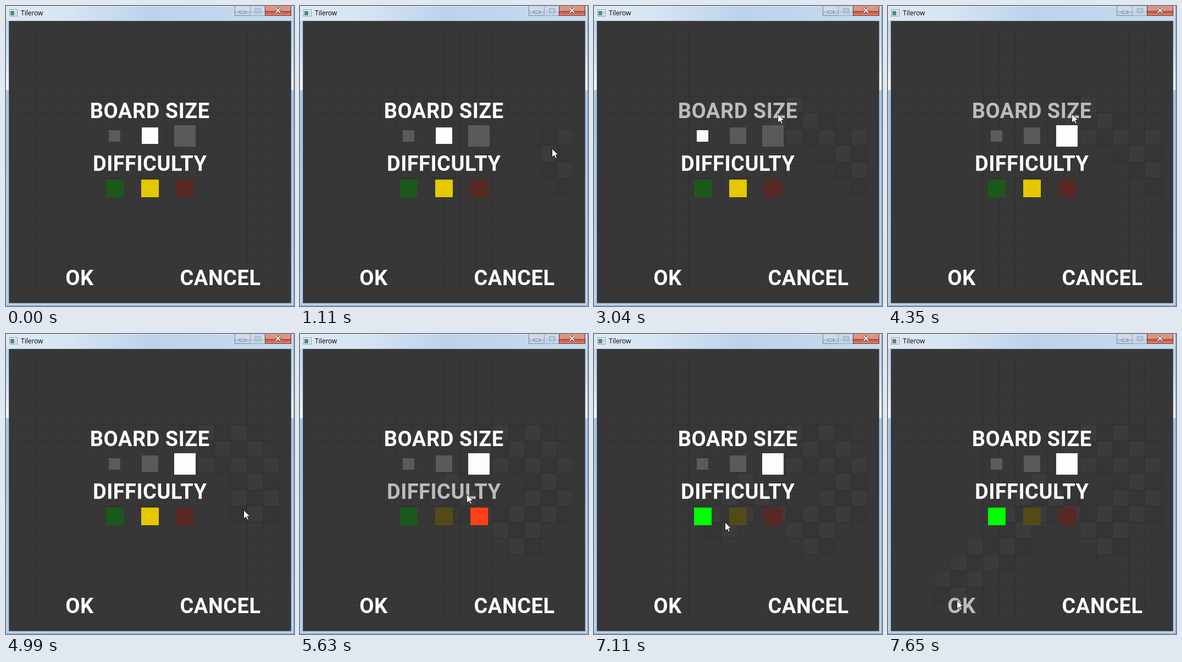
An HTML page with a canvas that plays this animation: 524x546 px, repeating every 8000 ms.

```html
<!DOCTYPE html>
<html lang="en">
<head>
<meta charset="utf-8">
<title>Tilerow</title>
<style>
html, body { margin: 0; width: 100%; height: 100%; overflow: hidden; background: #373737; }
canvas { display: block; }
</style>
</head>
<body>
<canvas id="stage" width="524" height="546"></canvas>
<script>
const ctx = document.getElementById('stage').getContext('2d');
const LOOP = 8000, TICK = 90;
const GRID = { x: 25, y: 47, pitch: 29.5, count: 16 };

// Pointer moves: one position per tick from each start time.
const moves = [
  { start: 930, points: [[509, 303], [476, 275], [458, 259]] },
  { start: 1480, points: [[440, 247], [415, 235], [375, 215], [345, 203], [334, 196]] },
  { start: 4630, points: [[380, 188], [430, 184], [452, 214], [448, 260], [432, 320], [421, 364], [372, 338], [330, 305], [303, 291]] },
  { start: 7020, points: [[272, 314], [238, 342], [232, 372], [212, 392], [186, 412], [146, 434], [126, 458], [125, 484]] }
];

const labels = [
  { text: 'BOARD SIZE', x: 261.7, y: 203.5, half: 107 },
  { text: 'DIFFICULTY', x: 261.7, y: 299.5, half: 105 },
  { text: 'OK', x: 134, y: 507.5, half: 24 },
  { text: 'CANCEL', x: 390, y: 507.5, half: 72 }
];

const sizes = [[187, 226, 21], [247, 221, 30], [306, 217, 39]];
const levels = [['#1b591b', '#00ff00'], ['#534a18', '#e6c800'], ['#592822', '#ff401a']];
const sizeChoices = [[0, 1], [2300, 2], [3040, 0], [3700, 1], [4350, 2]];
const levelChoices = [[0, 1], [5630, 2], [6280, 0]];

// Cells near the pointer's path keep a faint trace from the moment it passes.
const traces = new Map();
for (const { start, points } of moves) {
  points.forEach(([x, y], i) => {
    for (const dx of [-14, 14]) for (const dy of [-14, 14]) {
      const col = Math.floor((x + dx - GRID.x) / GRID.pitch);
      const row = Math.floor((y + dy - GRID.y) / GRID.pitch);
      const inside = col >= 0 && col < GRID.count && row < 15;
      const key = col + ',' + row;
      if (inside && !traces.has(key)) traces.set(key, { time: start + i * TICK, col, row });
    }
  });
}

function rect(x, y, w, h, color) {
  ctx.fillStyle = color;
  ctx.fillRect(x, y, w, h);
}

function gradient(x1, y1, stops) {
  const g = ctx.createLinearGradient(0, 0, x1, y1);
  stops.forEach(([at, color]) => g.addColorStop(at, color));
  return g;
}

function outline(x, y, w, h, color) {
  ctx.strokeStyle = color;
  ctx.lineWidth = 1;
  ctx.strokeRect(x + 0.5, y + 0.5, w - 1, h - 1);
}

function latest(choices, t) {
  return choices.filter(([start]) => start <= t).pop()[1];
}

function pointerAt(t) {
  const move = moves.filter(({ start }) => start <= t).pop();
  if (!move) return null;
  const step = Math.floor((t - move.start) / TICK);
  return move.points[Math.min(move.points.length - 1, step)];
}

function drawCaptionButton(x, w, top, bottom, border) {
  rect(x, 0, w, 18, gradient(0, 18, [[0, top], [0.5, top], [0.5, bottom], [1, top]]));
  outline(x, -1, w, 19, border);
}

function drawFrame() {
  rect(0, 0, 524, 546, gradient(0, 546, [
    [0, '#c9dbef'], [0.05, '#bfd5ec'], [0.16, '#cfe0f2'], [0.28, '#f2f7fc'],
    [0.28, '#a9c5e3'], [1, '#b9d2ec']]));
  rect(0, 0, 524, 27, gradient(524, 0, [[0, '#dce8f5'], [0.2, '#d8e5f3'], [0.5, '#bdd3eb'], [1, '#c8daee']]));
  rect(0, 0, 524, 1, '#e6f0fa');
  rect(523, 0, 1, 546, '#83a3c4');
  rect(0, 545, 524, 1, '#83a3c4');

  rect(6, 6, 15, 13, '#f4f6f7');
  outline(6, 6, 15, 13, '#8b989f');
  rect(8, 9, 7, 8, '#4f8980');
  rect(16, 9, 3, 8, '#c9d3d6');

  ctx.font = '12px "Open Sans", sans-serif';
  ctx.textAlign = 'left';
  ctx.letterSpacing = '0px';
  ctx.fillStyle = '#000';
  ctx.fillText('Tilerow', 27, 17);

  drawCaptionButton(416, 29, '#cfdbe9', '#adc0d5', '#71849a');
  drawCaptionButton(444, 28, '#cbdaeb', '#b8cce2', '#8ea2b9');
  drawCaptionButton(471, 48, '#dc9585', '#bd4329', '#6d302a');
  rect(425, 9, 12, 4, '#fff');
  outline(425, 9, 12, 4, '#596475');
  outline(453, 4, 11, 9, '#93a5bb');
  outline(455, 6, 7, 5, '#a5b5c8');
  for (const [width, color] of [[4, '#713d39'], [2, '#fff']]) {
    ctx.strokeStyle = color;
    ctx.lineWidth = width;
    ctx.stroke(new Path2D('M491 4l8 8M499 4l-8 8'));
  }

  rect(5, 27, 514, 514, '#373737');
  outline(5, 27, 514, 514, '#4b5866');
}

function drawBoard(t) {
  const { x, y, pitch, count } = GRID;
  for (const { time, col, row } of traces.values()) {
    if (t < time) continue;
    const left = Math.floor(x + col * pitch), top = Math.floor(y + row * pitch);
    rect(left, top, 30, 30, (col + row) % 2 ? 'rgba(255,255,255,.018)' : 'rgba(0,0,0,.04)');
  }
  const span = pitch * count;
  for (let i = 1; i <= count; i++) {
    const offset = Math.floor(i * pitch);
    rect(x + offset, y, 1, span, '#2f2f2f');
    rect(x, y + offset, span, 1, '#2f2f2f');
  }
}

function drawMenu(t, pointer) {
  ctx.font = '700 38px Roboto, sans-serif';
  ctx.textAlign = 'center';
  ctx.letterSpacing = '0.5px';
  for (const { text, x, y, half } of labels) {
    const hover = pointer && Math.abs(pointer[0] - x) <= half && pointer[1] >= y - 29 && pointer[1] <= y + 1;
    ctx.fillStyle = hover ? '#bcbcbc' : '#fff';
    ctx.fillText(text, x, y);
  }
  const size = latest(sizeChoices, t), level = latest(levelChoices, t);
  sizes.forEach(([x, y, side], i) => rect(x, y, side, side, i === size ? '#fdfdfd' : '#5a5a5a'));
  levels.forEach(([dim, lit], i) => rect(182 + 64 * i, 316, 32, 32, i === level ? lit : dim));
}

const arrow = new Path2D('M0 0V16L4 12.5L6.5 18L9 17L6.6 11.5H11.5Z');
function drawPointer([x, y]) {
  ctx.save();
  ctx.translate(x + 0.5, y + 0.5);
  ctx.fillStyle = '#fff';
  ctx.fill(arrow);
  ctx.strokeStyle = '#111';
  ctx.lineWidth = 1;
  ctx.stroke(arrow);
  ctx.restore();
}

const began = performance.now();
function draw() {
  const t = (performance.now() - began) % LOOP;
  const pointer = pointerAt(t);
  drawFrame();
  drawBoard(t);
  drawMenu(t, pointer);
  if (pointer) drawPointer(pointer);
  requestAnimationFrame(draw);
}
draw();
</script>
</body>
</html>
```
